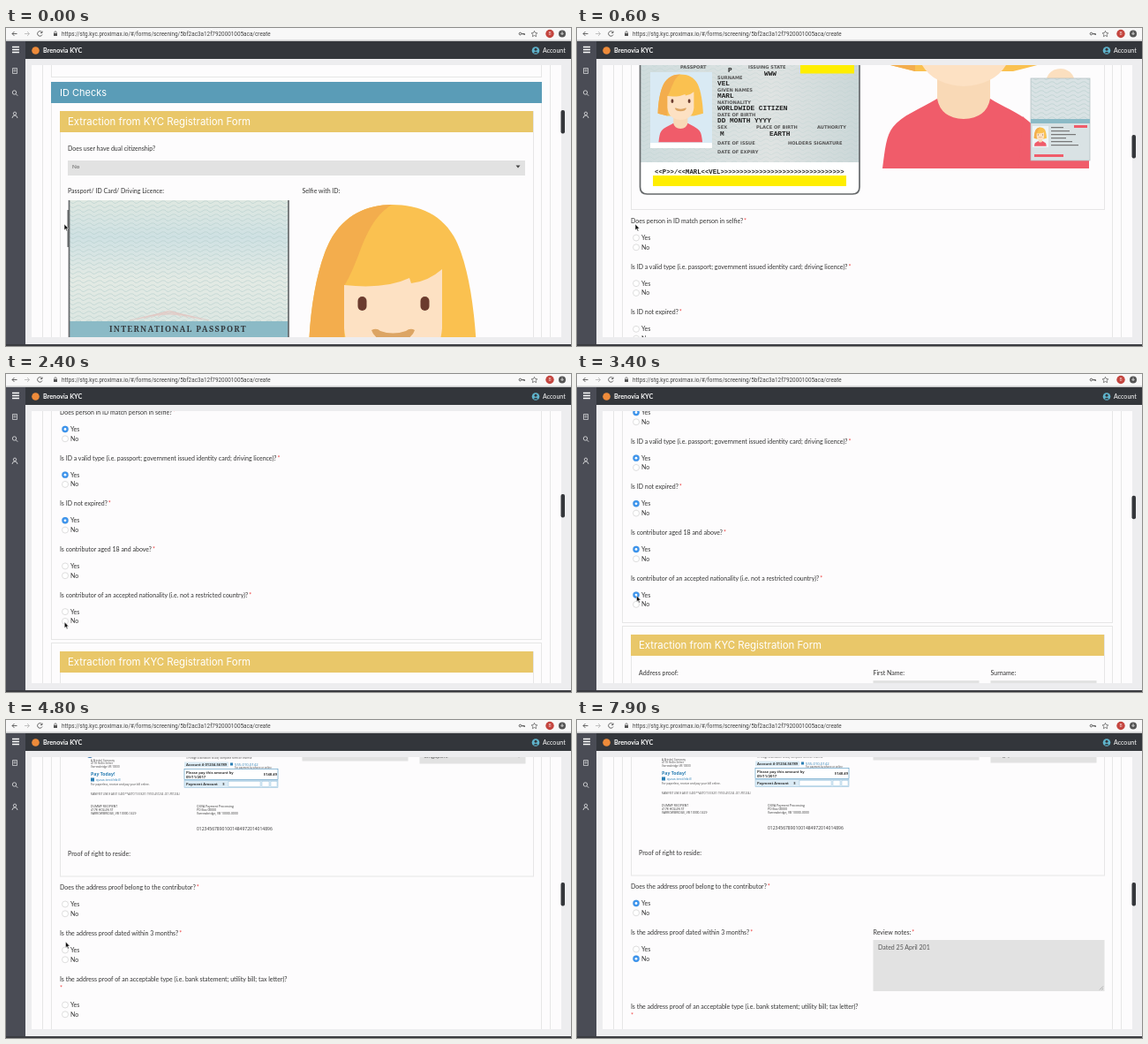
Animation, 640 px wide and 360 px high, one loop 8 s. Source, as an HTML page:

```html
<!DOCTYPE html>
<html lang="en">
<head>
<meta charset="utf-8">
<title>Screening form</title>
<style>
html, body { margin: 0; width: 100%; height: 100%; overflow: hidden; background: #ededef; }
svg { display: block; width: 640px; height: 360px; }
text { font-family: Lato, sans-serif; white-space: pre; }
.head { font-family: Inter, sans-serif; }
.url { font-family: Roboto, sans-serif; }
.mono { font-family: "Liberation Mono", monospace; }
.tag { font-family: "DejaVu Sans", sans-serif; font-weight: bold; }
.serif { font-family: "Noto Serif", serif; font-weight: bold; letter-spacing: 1.25px; }
.bill { font-family: "Open Sans", sans-serif; }
.b { font-weight: bold; }
</style>
</head>
<body>
<svg id="stage" viewBox="0 0 640 360">
  <defs>
    <clipPath id="view"><rect x="29" y="42" width="600" height="308"/></clipPath>
    <clipPath id="pass"><path d="M71 195H320V505q0 8-8 8H79q-8 0-8-8Z"/></clipPath>
    <linearGradient id="paper" x2="0" y2="1">
      <stop offset="0" stop-color="#dfe8e1"/><stop offset=".3" stop-color="#cfe1e3"/>
      <stop offset=".65" stop-color="#e3eae4"/><stop offset="1" stop-color="#dde7e2"/>
    </linearGradient>
    <linearGradient id="data">
      <stop offset="0" stop-color="#cfdcdd"/><stop offset=".6" stop-color="#dfe3e2"/><stop offset="1" stop-color="#cbd7d8"/>
    </linearGradient>
    <pattern id="waves" width="12" height="5" patternUnits="userSpaceOnUse">
      <path d="M0 1q3 4 6 1.500t6-1.500" fill="none" stroke="#b4cccb" stroke-width=".6"/>
    </pattern>
    <g id="girl">
      <path d="M343 364C344 320 352 270 367 241C383 211 410 200 437 200C468 200 495 211 510 241C524 270 531 320 533 364L494 374H383Z" fill="#fac150"/>
      <path d="M343 364C344 320 352 270 367 241C383 211 410 200 437 200C405 220 402 262 383 292V374Z" fill="#f3ad4d"/>
      <path d="M408 372H468V428H408Z" fill="#f9d9b6"/>
      <path d="M383 291Q430 296 457 283L459 289Q478 287 494 273V340Q490 388 438 391Q387 388 383 340Z" fill="#fde1c3"/>
      <rect x="398.500" y="304" width="10" height="16" rx="5" fill="#6b3b2e"/>
      <rect x="469.500" y="304" width="10" height="16" rx="5" fill="#6b3b2e"/>
      <path d="M414 342Q420 339 424 343Q438 348 453 343Q458 339 463 342Q459 355 438 355Q418 355 414 342Z" fill="#dca564"/>
      <path d="M346 484C349 462 350 447 358 437C368 424 388 417 408 405Q412 427 438 428Q464 427 468 405C486 416 508 424 518 437C526 447 527 462 530 484Z" fill="#f05c6a"/>
    </g>
  </defs>
</svg>
<script>
const NS = "http://www.w3.org/2000/svg", INK = "#333", RED = "#f05c6a", LABEL = 7;
const stage = document.getElementById("stage");
let box = stage;

function el(tag, attrs, parent = box) {
  const node = document.createElementNS(NS, tag);
  for (const key in attrs) node.setAttribute(key, attrs[key]);
  return parent.appendChild(node);
}
const rect = (x, y, w, h, fill, more) => el("rect", { x, y, width: w, height: h, fill, ...more });
const circle = (cx, cy, r, fill, more) => el("circle", { cx, cy, r, fill, ...more });
const path = (d, fill, stroke, width = 1) =>
  el("path", { d, fill: fill || "none", stroke: stroke || "none", "stroke-width": width });
const frame = (x, y, w, h) => rect(x + .5, y + .5, w, h, "none", { stroke: "#e6e6e6" });

// y is the vertical middle of the capitals
function text(x, y, str, size = LABEL, fill = INK, cls = "", anchor = "start") {
  const node = el("text", { x, y: y + size * .36, "font-size": size, fill, class: cls, "text-anchor": anchor });
  node.textContent = str;
  return node;
}
function group(fn, attrs = {}) {
  const old = box, g = el("g", attrs);
  box = g;
  fn();
  box = old;
  return g;
}
function required(label) {
  el("tspan", { fill: "#e33", dx: 1 }, label).textContent = "*";
}

const radios = [];
function radio(y, label, at) {
  circle(67, y, 3.5, "#fff", { stroke: "#d0d0d0", "stroke-width": .7 });
  text(73, y, label);
  if (at) radios.push([at, group(() => { circle(67, y, 3.7, "#3d94ec"); circle(67, y, 1.4, "#fff"); })]);
}
function question(y, str, yes, no, wrap = 0) {
  const label = text(61, y, str);
  if (wrap) text(61, y + 10, "*", LABEL, "#e33");
  else required(label);
  radio(y + 19 + wrap, "Yes", yes);
  radio(y + 29.8 + wrap, "No", no);
}
function field(x, y, label, value, select) {
  const top = y + (select ? 12 : 9);
  text(x, y, label);
  rect(x, top, 120, 17, "#e2e2e2");
  text(x + 5, top + 8.5, value, 6.3, "#555");
  if (select) path(`M${x + 110} ${top + 7}h5l-2.500 3z`, "#444");
}
function heading(y) {
  rect(61, y, 536, 24, "#e9c769");
  text(70, y + 12, "Extraction from KYC Registration Form", 11.4, "#fff", "head");
}

function passport() {
  group(() => {
    rect(71, 195, 249, 137, "url(#paper)");
    rect(71, 195, 249, 137, "url(#waves)");
    for (let i = 0; i < 5; i++)
      path(`M${140 + i * 8} ${331 - i}q${45 - i * 8}-14 ${90 - i * 16} 0`, "", "#e3c6c2", .7);
    rect(71, 332, 249, 22, "#8bbac6");
    text(117, 341, "INTERNATIONAL PASSPORT", 9, "#33383c", "serif");
    rect(71, 354, 249, 124, "url(#data)");
    rect(71, 354, 249, 124, "url(#waves)", { opacity: .5 });
    rect(71, 477, 249, 37, "#fff");
  }, { "clip-path": "url(#pass)" });
  path("M71.500 195V505q0 8 8 8H312q8 0 8-8V195", "", "#66696b", 1.7);
  rect(69.500, 206, 2.500, 42, "#66696b");
  rect(253, 364, 61, 12.500, "#ffee00");
  group(() => {
    rect(83, 50, 70, 86, "#fff");
    rect(83, 50, 70, 80, "#d9eaf4");
    el("use", { href: "#girl", transform: "translate(-1 -1.500) scale(.27)" });
    const tags = [
      [117, 44.5, "PASSPORT"], [194, 44.5, "ISSUING STATE"], [159, 56, "SURNAME"], [159, 70.3, "GIVEN NAMES"],
      [159, 84, "NATIONALITY"], [159, 97.7, "DATE OF BIRTH"], [159, 112, "SEX"], [203, 112, "PLACE OF BIRTH"],
      [272, 112, "AUTHORITY"], [159, 130, "DATE OF ISSUE"], [239, 130, "HOLDERS SIGNATURE"], [159, 140, "DATE OF EXPIRY"]];
    for (const [x, y, s] of tags) text(x, y, s, 5.1, "#555", "tag");
    const values = [
      [171, 47, "P"], [212, 51, "WWW"], [159, 62.5, "VEL"], [159, 76.5, "MARL"], [159, 90, "WORLDWIDE CITIZEN"],
      [159, 104, "DD MONTH YYYY"], [162, 119, "M"], [218, 119, "EARTH"]];
    for (const [x, y, s] of values) text(x, y, s, 7.8, "#222", "mono b");
    text(88, 162, "<<P>>/<<MARL<<VEL" + ">".repeat(32), 7.3, "#222", "mono b");
    rect(86, 167, 219, 12, "#ffee00");
  }, { transform: "translate(0 325)" });
}

function selfie() {
  path("M530 395Q530 371 548 371Q565 372 565 395Z", "#fbdfbf");
  el("use", { href: "#girl" });
  path("M505 425L530 452H580V484H500Z", RED);
  rect(514, 382, 67, 93, "#d9e2e4", { stroke: "#aebabe", "stroke-width": .7 });
  rect(514, 382, 67, 46, "url(#waves)");
  rect(514, 428, 67, 5, "#8bbac6");
  rect(516, 436, 18, 24, "#eef5f8");
  el("use", { href: "#girl", transform: "translate(492 422.500) scale(.075)" });
  for (let i = 0; i < 6; i++) rect(537, 437 + i * 4, 14 + (i * 7) % 18, 1.2, "#777");
  rect(563, 435, 15, 3, RED);
  rect(518, 468, 33, 3, RED);
}

const BLUE = "#2b7fb4", PALE = "#dbebf5";
const tiny = (x, y, s, size = 3.7, fill = "#444", cls = "", anchor) => text(x, y, s, size, fill, "bill " + cls, anchor);
const lines = (x, y, gap, arr, ...rest) => arr.forEach((s, i) => tiny(x, y + i * gap, s, ...rest));

function bill() {
  circle(266, 89, 6, "#3b78ad");
  text(279, 89, "QUVA", 12.5, "#246a98", "b");
  tiny(313, 99, "A Brindol Company", 3.9, "#777", "", "end");
  tiny(313, 103.5, "Page 1 of 3", 3, "#777", "", "end");
  rect(84, 105, 238, 25, PALE);
  lines(86, 110, 5.5, ["Name:", "Account Number:", "Phone Number:", "Service Address:"], 3.8, BLUE);
  lines(122, 110, 5.5, ["DUMMY RECIPIENT", "01234-56789", "555-010-0142", "4178 Hollin St, Varrowbridge"], 3.8);
  tiny(208, 110, "Emergency and Repair", 3.5, INK, "b");
  rect(208, 114, 5, 5, BLUE);
  tiny(216, 117, "555-010-0187", 4, BLUE);
  lines(208, 123, 4, ["This is the number to call to report power outages, gas leaks", "or odors, and safety hazards related to equipment."], 3);
  tiny(208, 137, "Billing Summary", 4.7, BLUE, "b");
  rect(208, 141, 106, .5, "#9bb");
  const rows = [[146, "Bill Date", "08/18/2017"], [151.5, "Thank you for your payment of $174.08 on 08/01/2017", ""],
    [161, "Current Period Charges", "", "b"], [167, "Electric", "$148.49"], [173, "Total New Charges", "$148.49", "b"]];
  for (const [y, label, sum, cls] of rows) {
    tiny(208, y, label, 3.9, INK, cls);
    tiny(313, y, sum, 3.9, INK, cls, "end");
  }
  rect(207, 177, 107, 8, "#2f82b5");
  tiny(209, 181, "Total Amount Due on 09/11/2017", 4.5, "#fff", "b");
  tiny(313, 181, "$148.49", 4.5, "#fff", "b", "end");

  circle(124, 154, 16, "none", { stroke: "#78ad4c", "stroke-width": 5 });
  path("M124 138A16 16 0 0 1 136 164.500", "", "#c5d9ac", 5);
  path("M120 169.500A16 16 0 0 0 128 169.500", "", "#555", 5);
  tiny(124, 149, "ELECTRIC", 3.4, "#777", "", "middle");
  tiny(124, 155, "$148.49", 5.5, INK, "b", "middle");
  lines(89, 136, 4, ["PRICE ELECTRIC", "DELIVERY"], 3.2, "#6a9a40");
  rect(85, 134, 3, 3, "#78ad4c");
  lines(149, 136, 4, ["ELECTRIC SUPPLY", "$78.20"], 3.2, "#9db879");
  lines(149, 146, 4, ["QUVA", "4178 Hollin St", "Varrowbridge, VB", "555-010-0142"], 3.2);
  rect(113, 177.500, 3, 3, INK);
  tiny(118, 179, "TAXES & FEES", 3.3, INK);

  rect(207, 191, 115, 54, PALE);
  tiny(213, 196, "General Information", 4.6, BLUE, "b");
  tiny(213, 201, "Next scheduled meter reading 09/18/2017", 3.4, INK, "b");
  tiny(213, 209, "1-555-010-0142", 4.6, BLUE);
  lines(213, 215, 4, ["If you have any questions or concerns, please call 555-010-0142",
    "before the due date. Our team is ready to help from Monday to", "Friday, si tiene alguna pregunta, por favor llame."], 3);
  tiny(213, 231, "quva.test/service", 4.6, BLUE);
  lines(213, 236, 4.2, ["Customer Self Service - Manage Your Account 24/7", "Start, stop and move your service"], 3.2);
  group(() => tiny(0, 0, "09-01234-56789-00148490", 3.2), { transform: "translate(72 245) rotate(-90)" });

  for (const x of [94, 152, 254]) rect(x, 288, 4, 4, BLUE);
  tiny(100, 290, "Online: quva.test", 3.8, BLUE);
  tiny(158, 290, "In Person: 4178 Hollin St, Varrowbridge, VB", 3.8, BLUE);
  tiny(260, 290, "By Phone: 555-010-0142", 3.8, BLUE);
  tiny(195, 297, "Please return this portion with your check made payable to QUVA. Please write your account number on your check.", 3.1, "#444", "", "middle");
  path("M70 293.500H320", "", "#aaa", .4);
  circle(95, 304, 4.5, "#3b78ad");
  text(102, 304, "QUVA", 6.5, "#246a98", "b");
  lines(96, 311, 3.8, ["A Brindol Company", "4178 Hollin Street", "Varrowbridge VB 10000"], 3);
  lines(204, 303, 5, ["□ Enroll in Automatic Payment; complete form on reverse", "□ Pledge a donation to aid; complete form on reverse"], 3);
  rect(202, 313, 50, 6, PALE);
  tiny(204, 316, "Account # 01234-56789", 4.1, INK, "b");
  rect(254, 314, 3, 3, BLUE);
  tiny(259, 315.5, "555-010-0142", 4.2, BLUE);
  tiny(259, 319.500, "For payment by phone or online", 2.8);
  rect(202, 321, 106, 12, "#fff", { stroke: BLUE, "stroke-width": .5 });
  lines(204, 325, 4.8, ["Please pay this amount by", "09/11/2017"], 4.1, INK, "b");
  tiny(307, 327, "$148.49", 4.1, INK, "b", "end");
  rect(202, 334, 106, 8, PALE, { stroke: "#8ab9d8", "stroke-width": .5 });
  tiny(204, 338, "Payment Amount     $", 4.1, INK, "b");
  for (const [x, w] of [[252, 36], [290, 8], [300, 7]]) rect(x, 335, w, 6, "#fff", { stroke: "#8ab9d8", "stroke-width": .4 });
  tiny(96, 327, "Pay Today!", 5.2, BLUE, "b");
  rect(96, 331, 4, 4, BLUE);
  tiny(102, 333, "quva.test/ebill", 4.2, BLUE);
  tiny(96, 338.500, "For paperless, receive and pay your bill online.", 3.1);
  tiny(96, 349, "MANIFEST LINE 8 AB 01 0.400 **AUTO T3 0 8231 19103-451234 -C01-P01234-I", 2.8, "#444", "mono");
  lines(96, 363, 4, ["DUMMY RECIPIENT", "4178 HOLLIN ST", "VARROWBRIDGE, VB 10000-1429"], 3.4, INK, "mono");
  lines(216, 363.500, 4, ["QUVA Payment Processing", "PO Box 00000", "Varrowbridge, VB 10000-0000"], 3.4, INK, "mono");
  tiny(216, 389, "012345678901001484972014014896", 5, INK, "mono");
}

let tail, review, note;
function page() {
  path("M41.500 0V1600M616.500 0V1600", "", "#e6e6e6");
  frame(51, -60, 555, 115);
  frame(51, 61, 555, 739);
  rect(51, 61, 556, 24, "#5a9cb7");
  text(61, 73, "ID Checks", 11, "#fff", "head");
  frame(61, 94, 536, 436);
  heading(94);
  text(70, 136.5, "Does user have dual citizenship?");
  rect(70, 150, 518, 17, "#e2e2e2");
  text(75, 157, "No", 6.3, "#555");
  path("M577.500 155.500h5l-2.500 3z", "#444");
  text(70, 184.5, "Passport/ ID Card/ Driving Licence:");
  text(335.5, 184.5, "Selfie with ID:");
  passport();
  selfie();
  [["Does person in ID match person in selfie?", 1300],
   ["Is ID a valid type (i.e. passport; government issued identity card; driving licence)?", 1600],
   ["Is ID not expired?", 1900],
   ["Is contributor aged 18 and above?", 2900],
   ["Is contributor of an accepted nationality (i.e. not a restricted country)?", 3300]
  ].forEach(([q, at], i) => question(543.5 + i * 51.65, q, at));

  frame(51, 804, 555, 800);
  frame(61, 814, 536, 421);
  heading(814);
  text(70, 857, "Address proof:");
  group(bill, { transform: "translate(0 793)" });
  [["First Name:", "Benedict", "Surname:", "Harlow"],
   ["Middle Name:", "", "Country of Tax Residence:", "Singapore", 1],
   ["First Line of Address:", "Quillon Residences", "Second Line of Address:", "Quillon Residences"],
   ["House/Building Number:", "28", "Unit/Apartment Number:", "14-07"],
   ["City/Town:", "Singapore", "State/Province:", "Singapore"],
   ["Postal Code:", "407316", "Country:", "Singapore", 1]
  ].forEach(([a, av, b, bv, select], i) => {
    const y = 857 + i * 43.5 + (i > 1 ? 4.5 : 0);
    field(335.5, y, a, av);
    field(468.5, y, b, bv, select);
  });
  text(70, 1209.5, "Proof of right to reside:");
  question(1248, "Does the address proof belong to the contributor?", 5400);
  question(1300, "Is the address proof dated within 3 months?", 0, 5700);
  tail = group(() => question(1351.5, "Is the address proof of an acceptable type (i.e. bank statement; utility bill; tax letter)?", 0, 0, 10.5));
  review = group(() => {
    required(text(335.5, 1299.5, "Review notes:"));
    rect(335.5, 1308.5, 262, 58, "#e2e2e2");
    path("M592 1365l4-4M594.500 1365l1.500-1.500", "", "#888", .6);
    note = text(341, 1316.5, "", LABEL, "#555");
  });
}

function chrome() {
  rect(0, 0, 640, 14, "#f8f8f8");
  rect(0, 13.500, 640, 1.500, "#c9cacb");
  path("M12.500 6.500H7M9.500 4L7 6.500L9.500 9", "", "#555", .9);
  path("M21 6.500h5.500M24 4l2.500 2.500L24 9", "", "#bbb", .9);
  path("M40.500 4.500A2.800 2.800 0 1 0 41 7.500M41 3.500v2h-2", "", "#555", .9);
  rect(54, 6, 4, 3, "#555");
  path("M54.800 6V5a1.200 1.200 0 0 1 2.400 0V6", "", "#555", .7);
  text(63, 6.5, "https://stg.kyc.proximax.io/#/forms/screening/5bf2ac3a12f7920001005aca/create", 6.36, "#444", "url");
  circle(582.5, 6.5, 1.3, "none", { stroke: "#555", "stroke-width": 1 });
  path("M584 6.500h3.500v1.500M586 6.500v1.500", "", "#555", .9);
  path("M598.500 3.300l1 2.200 2.400.3-1.800 1.600.5 2.300-2.100-1.200-2.100 1.200.5-2.300-1.800-1.600 2.400-.3z", "", "#555", .7);
  circle(616, 6.5, 4.7, "#c4453f");
  text(616, 6.5, "B", 5, "#f3d5d2", "url", "middle");
  circle(630, 6.5, 4, "#555");
  path("M630 4.200v3M628.500 6l1.500 1.500 1.500-1.500", "", "#fff", .8);

  rect(22, 15, 618, 20, "#33363b");
  rect(0, 15, 22, 345, "#4a4c55");
  path("M7 21.500h8M7 24.500h8M7 27.500h8", "", "#fff", 1.400);
  circle(33.5, 25.5, 4.3, "#ee8b3a");
  text(42, 25, "Brenovia KYC", 7.2, "#fff", "b");
  circle(600, 25.5, 4.3, "#5fb4cc");
  circle(600, 24.300, 1.500, "#33363b");
  path("M597.300 28.500q2.700-3.500 5.400 0z", "#33363b");
  text(608, 25.3, "Account", 7.1, "#fff");
  path("M7.500 45.500h5v6h-5zM8.500 47.300h3M8.500 49h3", "", "#d5d6d9", .8);
  circle(9.5, 73, 2.2, "none", { stroke: "#d5d6d9", "stroke-width": .9 });
  path("M11.200 74.700l2 2", "", "#d5d6d9", 1);
  circle(10, 96.8, 1.7, "none", { stroke: "#d5d6d9", "stroke-width": .9 });
  path("M7 102q.3-3 3-3t3 3", "", "#d5d6d9", .9);
  rect(0, 358, 640, 2, "#3a3b40");
}

rect(22, 35, 618, 325, "#ededef");
rect(29, 42, 600, 308, "#fdfcfd");
let sheet;
group(() => { sheet = group(page); }, { "clip-path": "url(#view)" });
chrome();
const thumb = rect(628.5, 93, 4.5, 26.5, "#35373b", { rx: 2 });
const pointer = path("M0 0V6.800L1.600 5.400L2.700 8L3.800 7.500L2.700 5H4.800Z", "#111", "#fff", .5);

const scrolls = [[0, 0], [100, 25], [300, 160], [500, 290], [600, 325], [800, 353], [900, 355], [1900, 355], [2100, 400],
  [2400, 500], [2700, 519], [3600, 519], [3700, 540], [4200, 793], [4600, 1015], [4700, 1050], [4800, 1058.5], [5000, 1059.5]];
const moves = [[0, 66, 222], [1000, 66, 222], [1200, 66, 205], [1300, 66, 205], [1500, 66, 257], [1600, 66, 257],
  [1850, 66, 309], [2300, 66, 309], [2700, 67, 196], [2950, 67, 196], [3200, 67.5, 251], [4900, 67.5, 251],
  [5200, 67.5, 206], [5400, 67.5, 206], [5600, 67.5, 269]];

function at(track, t, col = 1) {
  const i = track.findIndex(k => k[0] > t);
  if (i < 0) return track[track.length - 1][col];
  const a = track[i - 1], b = track[i];
  return a[col] + (b[col] - a[col]) * (t - a[0]) / (b[0] - a[0]);
}
const show = (node, on) => node.setAttribute("visibility", on ? "visible" : "hidden");

const LOOP = 8000, STEP = 100, NOTE = "Dated 25 April 201";
function draw(t) {
  const y = at(scrolls, t), noted = t >= 5900;
  sheet.setAttribute("transform", `translate(0 ${-y})`);
  thumb.setAttribute("y", 93 + y * .086);
  pointer.setAttribute("transform", `translate(${at(moves, t)} ${at(moves, t, 2)})`);
  show(pointer, t < 6200);
  for (const [when, dot] of radios) show(dot, t >= when);
  show(review, noted);
  tail.setAttribute("transform", `translate(0 ${noted ? 32.5 : 0})`);
  note.textContent = NOTE.slice(0, Math.max(0, Math.floor((t - 6100) / STEP)));
}

const start = performance.now();
function tick() {
  const t = (performance.now() - start) % LOOP;
  draw(Math.floor(t / STEP) * STEP);
  requestAnimationFrame(tick);
}
tick();
</script>
</body>
</html>
```
